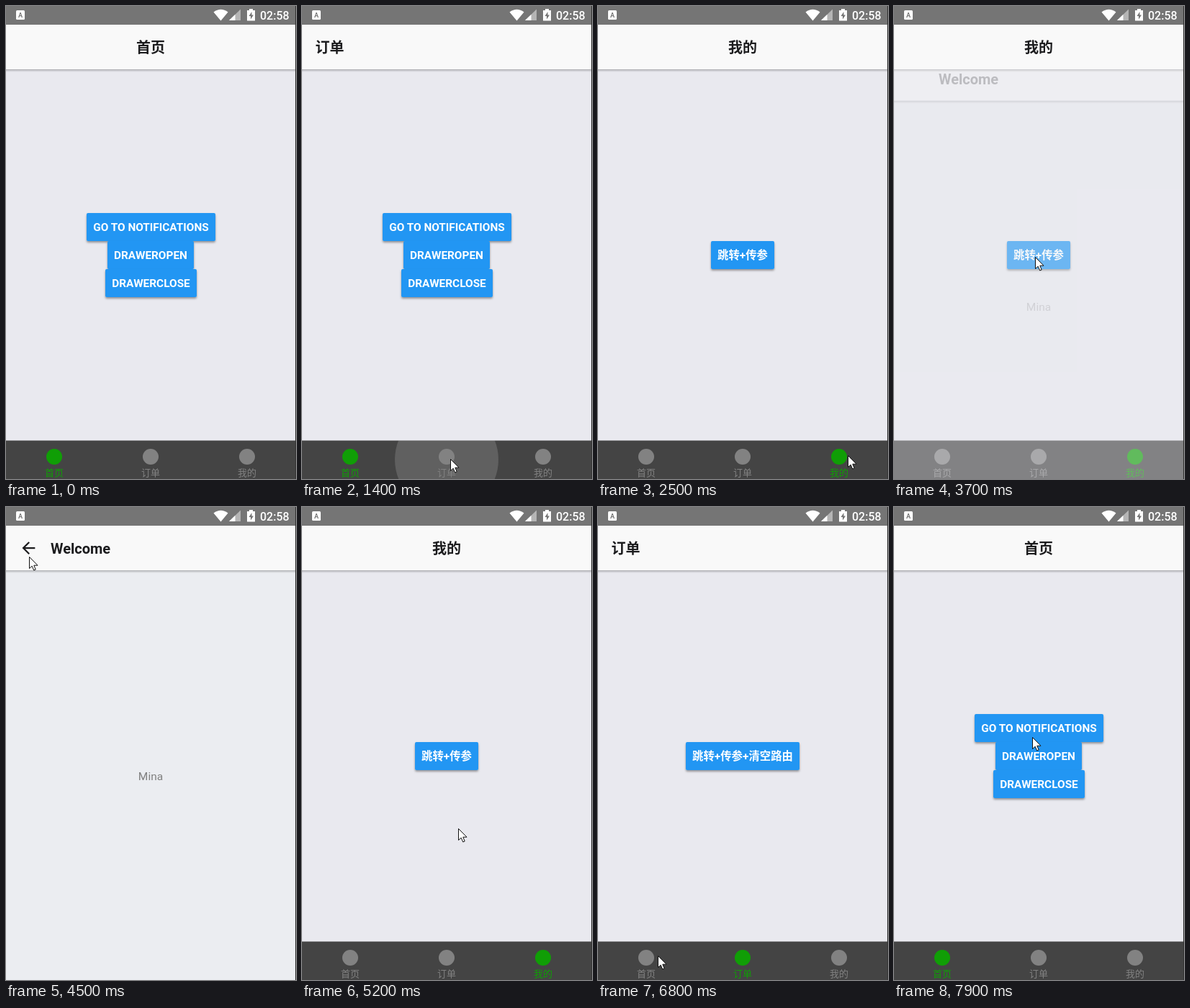
These frames come from a looping animation (403x658 px, 8 s). An HTML page:

```html
<!DOCTYPE html>
<html lang="zh">
<head>
<meta charset="utf-8">
<style>
  html, body { margin: 0; height: 100%; overflow: hidden; background: #e9e9ef; }
  svg { display: block; width: 403px; height: 658px; font-family: Roboto, "Noto Sans CJK SC", "Noto Sans CJK", sans-serif; }
  .title { font-size: 20px; font-weight: 700; fill: #1c1c1e; }
  .button { font-size: 15.4px; font-weight: 700; fill: #fff; text-anchor: middle; }
  .label { font-size: 13px; text-anchor: middle; }
  .mid { text-anchor: middle; }
</style>
</head>
<body>
<svg viewBox="0 0 403 658">
  <defs>
    <linearGradient id="shade" x2="0" y2="1">
      <stop stop-color="#000" stop-opacity=".25"/>
      <stop offset="1" stop-color="#000" stop-opacity="0"/>
    </linearGradient>
    <filter id="lift" x="-10%" y="-20%" width="120%" height="150%">
      <feDropShadow dx="0" dy="2" stdDeviation="1.6" flood-opacity=".38"/>
    </filter>
    <clipPath id="bar"><path d="M0 604.5h403v54H0z"/></clipPath>
    <clipPath id="head"><path d="M0 26h403v62H0z"/></clipPath>
  </defs>
  <g id="stage"></g>
  <g id="status">
    <path d="M0 0h403v26H0z" fill="#757575"/>
    <rect x="14" y="6" width="12" height="13" rx="1.5" fill="#fff"/>
    <text x="20" y="15.500" font-size="9" font-weight="700" fill="#757575" class="mid">A</text>
    <path d="M288.500 8.500Q298.500 1 308.500 8.500L298.500 20.500z" fill="#fff"/>
    <path d="M326 4.500V20H310z" fill="#b5b5b5"/>
    <path d="M318.500 11.800V20H310z" fill="#fff"/>
    <path d="M338 4h5v2h3v14.500h-11V6h3z" fill="#fff"/>
    <path d="M341.500 8l-4 6h2.500v4.500l4-6h-2.500z" fill="#757575"/>
    <text x="353" y="18.500" font-size="16" font-weight="500" fill="#fff">02:58</text>
  </g>
  <path d="M402 0h1v658h-1z" fill="#333"/>
  <path id="cursor" d="M.5.500V16.500L4.200 13.200 6.700 19 9.200 18 6.800 12.200H12z" fill="#fff" stroke="#111" stroke-linejoin="round"/>
</svg>
<script>
const LOOP = 8000, STEP = 100, MID = 201;
const pages = [
  { title: '首页', buttons: ['GO TO NOTIFICATIONS', 'DRAWEROPEN', 'DRAWERCLOSE'] },
  { title: '订单', left: true, buttons: ['跳转+传参+清空路由'] },
  { title: '我的', buttons: ['跳转+传参'] }
];
const tabX = i => MID + 134 * (i - 1);
// the body follows one step after the title
const taps = [
  { press: 1200, change: 1400, tab: 1 },
  { press: 2200, change: 2300, tab: 2 },
  { press: 6000, change: 6100, tab: 1 },
  { press: 7000, change: 7100, tab: 0 }
];
// pointer moves: start, end, x, y of the tip at the end
const moves = [
  [500, 1100, 206, 630], [1500, 2100, 347, 625], [2800, 3300, 196, 349],
  [3800, 4700, 23, 54], [4800, 5200, 217, 447], [5200, 5700, 206, 628],
  [6200, 6800, 83, 624], [7100, 7500, 86, 484], [7600, 7900, 192, 320]
];

const $ = id => document.getElementById(id);
const part = (t, from, to) => Math.min(1, Math.max(0, (t - from) / (to - from)));
const pen = document.createElement('canvas').getContext('2d');

function pointer(t) {
  let x = 287, y = 332;
  for (const [from, to, toX, toY] of moves) {
    const e = 1 - (1 - part(t, from, to)) ** 2;
    x += (toX - x) * e;
    y += (toY - y) * e;
  }
  return [x, y].map(Math.round);
}

const box = (x, y, w, h, fill) => `<rect x="${x}" y="${y}" width="${w}" height="${h}" fill="${fill}"/>`;

const header = title => box(0, 26, 403, 62, '#f9f9f9') + box(0, 88, 403, 4, 'url(#shade)') + title;

// buttons are as wide as their text and stacked around the middle of the page
function button(text, i, all) {
  pen.font = '700 15.4px Roboto, "Noto Sans CJK SC", "Noto Sans CJK", sans-serif';
  const w = Math.round(pen.measureText(text).width) + 18;
  const x = Math.round(MID - w / 2), y = 346.5 + 39 * (i - all.length / 2);
  return `<rect x="${x}" y="${y}" width="${w}" height="39" rx="2" fill="#2196f3" filter="url(#lift)"/>
    <text class="button" x="${x + w / 2}" y="${y + 25}">${text}</text>`;
}

function tabBar(active, t) {
  let out = box(0, 604.5, 403, 54, '#444');
  for (const { press, change, tab } of taps) {
    if (t < press || t > change + STEP) continue;
    const r = t === press ? 43 : 72, alpha = t > change ? .07 : .15;
    out += `<circle cx="${tabX(tab)}" cy="631" r="${r}" fill="#fff" fill-opacity="${alpha}" clip-path="url(#bar)"/>`;
  }
  pages.forEach((page, i) => {
    out += `<g fill="${i === active ? '#109e06' : '#828282'}"><circle cx="${tabX(i)}" cy="627" r="11"/>
      <text class="label" x="${tabX(i)}" y="654">${page.title}</text></g>`;
  });
  return out;
}

// the detail page fades in while rising, and leaves the same way
function detail(t) {
  const p = Math.min(part(t, 3600, 4000), part(t, 5200, 4900));
  if (!p) return '';
  const alpha = 1 - (1 - p) ** 1.6, drop = 50 * (1 - p ** 1.5);
  const ripple = t === 4900 || t === 5000
    ? '<circle cx="31" cy="57" r="31" fill-opacity=".14" clip-path="url(#head)"/>' : '';
  const arrow = p > .4
    ? '<path transform="translate(18 43.700) scale(1.117)" d="M20 11H7.830l5.590-5.590L12 4l-8 8 8 8 1.410-1.410L7.830 13H20z" fill="#1c1c1e"/>' : '';
  return `<g opacity="${alpha}" transform="translate(0 ${drop})">${box(0, 26, 403, 632, '#ebedf1')}${header('')}${ripple}
    <g opacity="${Math.sqrt(alpha)}">${arrow}<text class="title" x="62" y="65">Welcome</text>
    <text class="mid" x="${MID}" y="380" font-size="15.500" fill="#808080">Mina</text></g></g>`;
}

function draw(t) {
  let top = 0, body = 0;
  for (const { change, tab } of taps) {
    if (t >= change) top = tab;
    if (t > change) body = tab;
  }
  const { title, left } = pages[top];
  $('stage').innerHTML = box(0, 0, 403, 658, '#e9e9ef')
    + header(`<text class="title${left ? '' : ' mid'}" x="${left ? 18.5 : MID}" y="65">${title}</text>`)
    + pages[body].buttons.map(button).join('') + tabBar(body, t) + detail(t);
  $('cursor').setAttribute('transform', `translate(${pointer(t)})`);
  $('cursor').style.display = t < 500 ? 'none' : '';
}

let last = -1;
const start = performance.now();
function tick() {
  const t = Math.floor((performance.now() - start) % LOOP / STEP) * STEP;
  if (t !== last) draw(last = t);
  requestAnimationFrame(tick);
}
tick();
</script>
</body>
</html>
```
